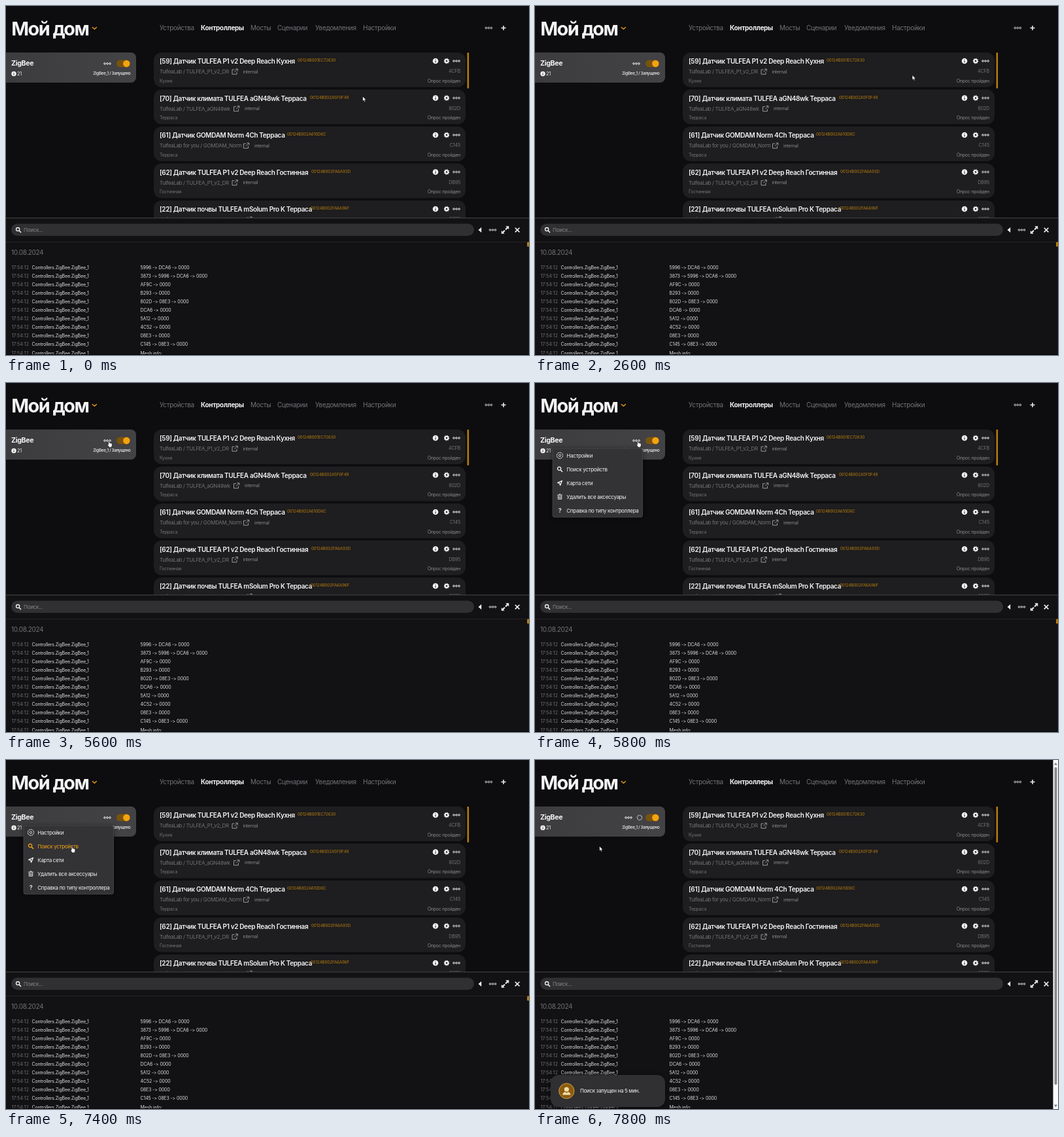
Write an HTML page that moves like this. It is 800 px wide and 533 px high and loops after 8 s.

```html
<!DOCTYPE html>
<html lang="ru">
<head>
<meta charset="utf-8">
<title>Мой дом</title>
<style>
html, body { margin: 0; width: 100%; height: 100%; overflow: hidden; background: #0d0c0e; }
svg { display: block; width: 800px; height: 533px; font-family: Inter, "Noto Sans", sans-serif; }
text { white-space: pre; }
</style>
</head>
<body>
<svg id="stage" viewBox="0 0 800 533" xmlns="http://www.w3.org/2000/svg"></svg>
<script>
const WHITE = '#f4f4f5', GRAY = '#737276', ORANGE = '#f3a30f', DIM_ORANGE = '#b47c0f';

// y is the vertical middle of the capitals
function label(x, y, str, size, fill, { weight = 400, spacing = -0.03 * size, anchor = 'start' } = {}) {
  return `<text x="${x}" y="${y + size * 0.36}" font-size="${size}" font-weight="${weight}" fill="${fill}"
    letter-spacing="${spacing}" text-anchor="${anchor}">${str.replace(/>/g, '&gt;')}</text>`;
}
const box = (x, y, w, h, r, fill, extra = '') =>
  `<rect x="${x}" y="${y}" width="${w}" height="${h}" rx="${r}" fill="${fill}" ${extra}/>`;
const disc = (x, y, r, fill) => `<circle cx="${x}" cy="${y}" r="${r}" fill="${fill}"/>`;
const ring = (x, y, r, stroke, width, extra = '') =>
  `<circle cx="${x}" cy="${y}" r="${r}" fill="none" stroke="${stroke}" stroke-width="${width}" ${extra}/>`;
const line = (d, stroke, width, extra = '') =>
  `<path d="${d}" fill="none" stroke="${stroke}" stroke-width="${width}" ${extra}/>`;
const shape = (d, fill, extra = '') => `<path d="${d}" fill="${fill}" ${extra}/>`;
const at = (x, y, content) => `<g transform="translate(${x} ${y})">${content}</g>`;

const dots = (x, y) => [-4, 0, 4].map(dx => ring(x + dx, y, 1.3, WHITE, 0.9)).join('');
const info = (x, y, r) => disc(x, y, r, WHITE) +
  line(`M${x} ${y - r * 0.55}v${r * 0.25}M${x} ${y - r * 0.08}v${r * 0.65}`, '#29292b', r * 0.28);
const gear = (x, y) => ring(x, y, 2.3, WHITE, 2) +
  ring(x, y, 3.6, WHITE, 1.3, 'pathLength="16" stroke-dasharray="1.1 .9"');
const magnifier = (x, y, color) => ring(x - 0.9, y - 0.9, 2.6, color, 1.3) +
  line(`M${x + 1} ${y + 1}l3 3`, color, 1.6);
const externalLink = (x, y) =>
  line(`M${x - 0.5} ${y - 3}h-3.5v7h7v-3.5M${x + 1} ${y - 4}h3.3v3.3M${x + 4} ${y - 3.8}l-4.5 4.5`, '#9a999d', 1);

const cards = [
  ['[59] Датчик TULFEA P1 v2 Deep Reach Кухня', 446, '00124B001EC72630', 'TulfeaLab / TULFEA_P1_v2_DR', 350, '4CFB', 'Кухня'],
  ['[70] Датчик климата TULFEA aGN48wk Терраса', 465, '00124B002A5F0F49', 'TulfeaLab / TULFEA_aGN48wk', 352.5, '802D', 'Терраса'],
  ['[61] Датчик GOMDAM Norm 4Ch Терраса', 430, '00124B002A610D6C', 'TulfeaLab for you / GOMDAM_Norm', 367.5, 'C145', 'Терраса'],
  ['[62] Датчик TULFEA P1 v2 Deep Reach Гостинная', 467, '00124B002FA6A93D', 'TulfeaLab / TULFEA_P1_v2_DR', 350, 'DB95', 'Гостинная'],
  ['[22] Датчик почвы TULFEA mSolum Pro K Терраса', 466, '00124B002FA6A96F', 'TulfeaLab / TULFEA_mSolum_ProK', 372, '08E3', 'Терраса'],
];

function card([title, idX, id, model, linkX, code, room], i) {
  return at(0, 71 + i * 56.5,
    box(226, 0, 477, 53, 12, '#1e1d1f') +
    label(235, 13.7, title, 10, WHITE, { weight: 600, spacing: -0.36 }) +
    label(idX, 12, id, 6.25, DIM_ORANGE, { spacing: -0.12 }) +
    label(235, 29.5, model, 8, GRAY, { spacing: -0.33 }) +
    externalLink(linkX, 29.2) +
    label(linkX + 12.5, 29.3, 'internal', 7, '#8a898d', { spacing: -0.25 }) +
    label(235, 43.2, room, 7, GRAY) +
    info(657, 13, 4.3) + gear(674, 13) + dots(689, 13) +
    label(695, 28.5, code, 7.2, GRAY, { anchor: 'end' }) +
    label(695, 43.2, 'Опрос пройден', 7, '#8a898d', { anchor: 'end' }));
}

const tabs = [['Устройства', 235], ['Контроллеры', 298], ['Мосты', 374], ['Сценарии', 415],
  ['Уведомления', 473], ['Настройки', 546]];

const header =
  label(8.2, 34.3, 'Мой дом', 28.8, WHITE, { weight: 700, spacing: -1.5 }) +
  line('M132 32.2l3.4 3.2l3.4-3.2', ORANGE, 1.4) +
  tabs.map(([name, x], i) => label(x, 33.5, name, 10, i === 1 ? WHITE : GRAY,
    { weight: i === 1 ? 650 : 400 })).join('') +
  dots(738.3, 33.5) + line('M757.5 33.5h7M761 30v7', WHITE, 1.5);

const controller =
  box(-12, 71, 211, 46, 8, 'url(#panel)') +
  label(8, 87, 'ZigBee', 10.6, WHITE, { weight: 650, spacing: -0.35 }) +
  info(12, 103.5, 3.7) + label(17, 103.5, '21', 7.2, WHITE) +
  label(190.5, 103, 'ZigBee_1 / Запущено', 6.25, WHITE, { weight: 450, spacing: -0.28, anchor: 'end' }) +
  box(169, 82.5, 21, 11, 5.5, '#78530d') + disc(184.3, 88, 5.2, ORANGE);

const routes = ['5996 -> DCA6', '3873 -> 5996 -> DCA6', 'AF9C', 'B293', '802D -> 08E3', 'DCA6',
  '5A12', '4C52', '08E3', 'C145 -> 08E3'].map(path => path + ' -> 0000').concat('Mesh info:');

const logPanel =
  box(0, 323.5, 800, 210, 0, '#121113') +
  box(0, 323.3, 800, 1, 0, '#48474a') +
  box(8, 332.5, 708, 18.5, 9.25, '#302f32') +
  magnifier(19, 342, WHITE) + label(27, 342.2, 'Поиск...', 8, '#858488') +
  shape('M722.5 342l4.7-4v8z', WHITE) + dots(744.5, 342) +
  shape('M764.3 336.3h4.9v4.9zM757.8 342.9v4.9h4.9z', WHITE) +
  line('M767.6 338l-3.5 3.5M759.4 346.2l3.5-3.5', WHITE, 2) +
  line('M778.8 338.8l6.6 6.6m0-6.6l-6.6 6.6', WHITE, 1.6) +
  box(0, 360, 800, 0.8, 0, '#2b2a2d') +
  box(797, 360.5, 4, 7, 1.2, DIM_ORANGE) +
  label(8, 376, '10.08.2024', 10, GRAY, { spacing: -0.35 }) +
  routes.map((route, i) => {
    const y = 399 + i * 13.1;
    return label(8.5, y, '17:54:12', 7, GRAY, { spacing: 0 }) +
      label(39.5, y, 'Controllers.ZigBee.ZigBee_1', 7, '#dedee0', { spacing: -0.17 }) +
      label(205.5, y, route, 7, '#dedee0', { spacing: -0.13 });
  }).join('') +
  box(0, 532, 800, 1, 0, '#050505');

const menuItems = [
  ['Настройки', c => ring(0, 0, 4.6, c, 0.9, 'pathLength="32" stroke-dasharray="3.3 .7"') + ring(0, 0, 1.7, c, 0.8)],
  ['Поиск устройств', c => magnifier(0, 0, c)],
  ['Карта сети', c => line('M-3.4 -.4L3.4 -3.4L.6 3.6L-.4 .5Z', c, 1.3, 'stroke-linejoin="round"')],
  ['Удалить все аксессуары', c => line('M-3.7 -2.6h7.4M-1.2 -3.8h2.4', c, 1) +
    line('M-2.7 -1.6v5.2h5.4v-5.2M-.9 -1v3.6M.9 -1v3.6', c, 0.9)],
  ['Справка по типу контроллера', c => label(0, 0, '?', 9, c, { weight: 600, anchor: 'middle' })],
];

const menu = hovered =>
  box(27, 100, 137.5, 105, 3, '#333235', 'stroke="#4b4a4d" stroke-width=".8" filter="url(#shadow)"') +
  menuItems.map(([name, icon], i) => {
    const color = i === hovered ? ORANGE : WHITE, y = 110.7 + i * 21;
    return at(38, y, icon(color)) + label(48.3, y, name, 8, color, { spacing: -0.28 });
  }).join('');

const spinner = ring(160, 88, 3.6, WHITE, 1.3, 'pathLength="16" stroke-dasharray="1 1"');

const toast =
  box(24, 481, 175, 49, 12, '#302f32', 'filter="url(#shadow)"') +
  disc(48.3, 505.5, 12, '#8c5c0b') + ring(48.3, 505.5, 11.6, '#c9a25a', 0.9) +
  disc(48.3, 503, 3.6, '#f1dcae') +
  shape('M42 511.5q1-4.5 4-4.5l2.3 1.5l2.3-1.5q3 0 4 4.5z', '#f1dcae') +
  label(69, 505.5, 'Поиск запущен на 5 мин.', 8, WHITE, { spacing: -0.34 });

const pageScrollbar =
  box(792.5, 0, 8, 533, 0, '#fafafa') + box(794.5, 11, 4, 485, 2, '#8a8a8c') +
  shape('M796.5 4l2.5 3.5h-5zM796.5 530l2.5-3.5h-5z', '#77777a');

const arrow = shape('M0 0v7.4l1.7-1.5l1.2 2.6l1.4-.6l-1.2-2.5h2.4z', '#fff', 'stroke="#000" stroke-width=".6"');
const hand = shape('M1.6 .6q.9-1 1.7 0v3q1-.6 1.4.2q1-.4 1.4.4q1.2-.2 1.2 1v2q0 1-.7 1.8v1.2h-4q-.2-1-1.2-2.1l-1.4-2q0-1.2 1.6 0z',
  '#fff', 'stroke="#000" stroke-width=".6"');

const stage = document.getElementById('stage');
stage.innerHTML = `<defs>
  <linearGradient id="panel"><stop offset="0" stop-color="#3c3b3e"/><stop offset="1" stop-color="#434245"/></linearGradient>
  <filter id="shadow" x="-20%" y="-20%" width="140%" height="140%" color-interpolation-filters="sRGB">
    <feDropShadow dx="0" dy="1" stdDeviation="3" flood-color="#000" flood-opacity=".5"/></filter>
  </defs>` + box(0, 0, 800, 533, 0, '#0d0c0e') + header + controller +
  cards.map(card).join('') + box(705.5, 71, 2.6, 55, 1.3, DIM_ORANGE) + logPanel + '<g id="live"></g>';
const live = document.getElementById('live');

// start time, end time, destination
const moves = [[200, 1000, 577, 105.5], [4600, 5400, 155, 88], [6200, 7000, 98.5, 131.5]];
const ease = p => p < 0.5 ? 2 * p * p : 1 - 2 * (1 - p) ** 2;

function pointer(t) {
  let x = 545.5, y = 138;
  for (const [start, end, toX, toY] of moves) {
    const p = ease(Math.min(1, Math.max(0, (t - start) / (end - start))));
    x += (toX - x) * p;
    y += (toY - y) * p;
  }
  return { x, y };
}

function draw(t) {
  const { x, y } = pointer(t);
  const menuOpen = t >= 5800 && t < 7600, searching = t >= 7600;
  const hovered = y >= 100 ? Math.floor((y - 100) / 21) : -1;
  const overLink = t >= 5400 && !searching;
  live.innerHTML = dots(searching ? 143 : 155, 88) +
    (searching ? spinner : '') +
    (menuOpen ? menu(hovered) : '') +
    (t >= 7800 ? toast + pageScrollbar : '') +
    at(x, y, overLink ? hand : arrow);
}

const LOOP = 8000, STEP = 200;
let shown = -1;
function tick() {
  const t = Math.floor(performance.now() % LOOP / STEP) * STEP;
  if (t !== shown) draw(shown = t);
  requestAnimationFrame(tick);
}
tick();
</script>
</body>
</html>
```
